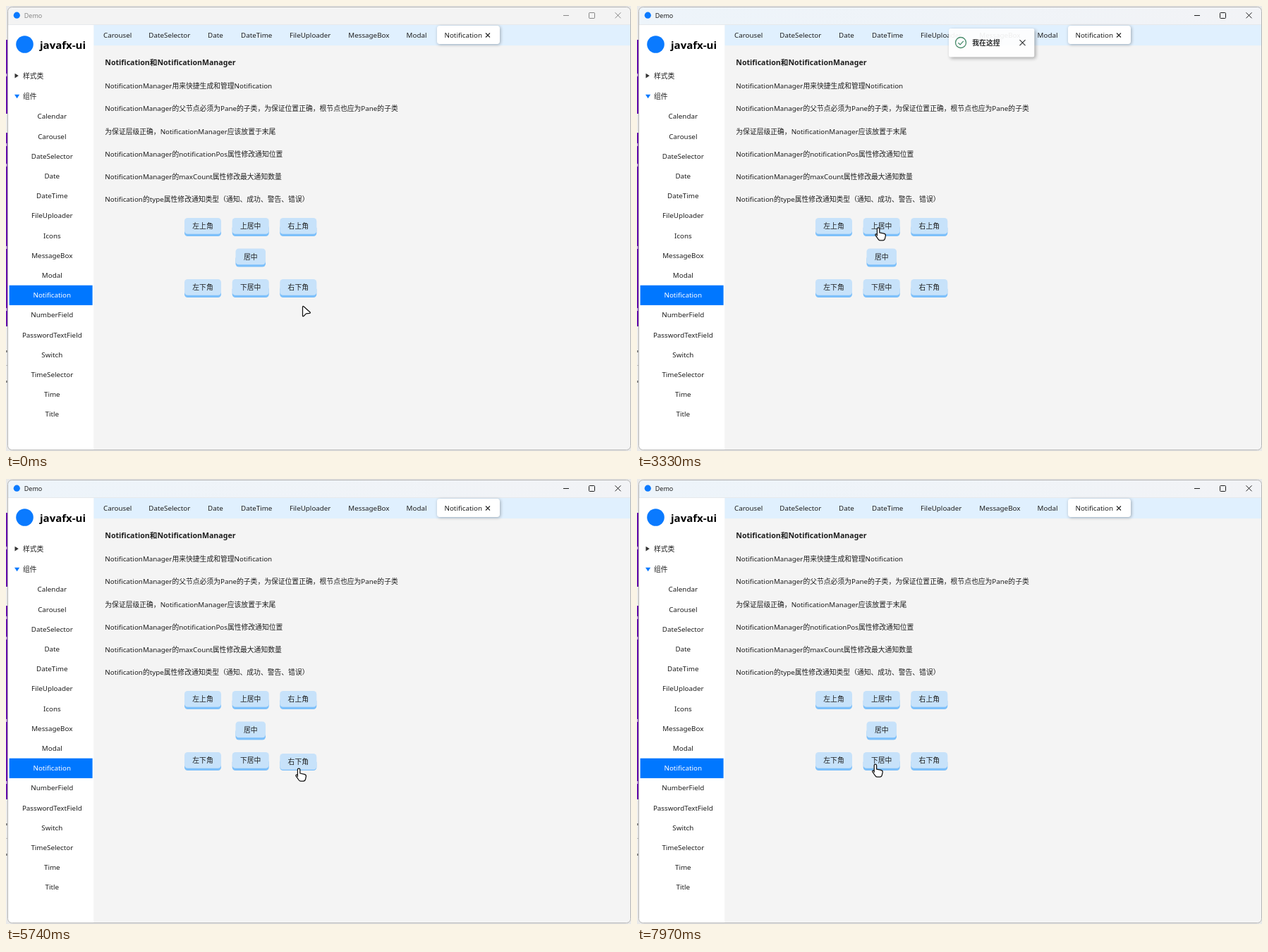
Recreate the animation shown at these times as an HTML page. Size 886 by 632 pixels, loop 8 s.

```html
<!DOCTYPE html>
<html lang="zh-CN">
<head>
<meta charset="utf-8">
<title>Demo</title>
<style>
html, body { margin: 0; width: 100%; height: 100%; overflow: hidden; background: #e9e9e9; }
svg { display: block; width: 886px; height: 632px; font: 9.8px "Noto Sans", "Noto Sans CJK SC", "Noto Sans CJK", sans-serif; fill: #1e1e1e; }
.mid { text-anchor: middle; }
.b { font-weight: 700; }
.shadow { filter: drop-shadow(1px 1px 2px rgba(0,0,0,.3)); }
.toast { filter: drop-shadow(2px 2px 2.5px rgba(0,0,0,.34)); }
</style>
</head>
<body>
<svg id="stage" viewBox="0 0 886 632" xmlns="http://www.w3.org/2000/svg">
  <defs>
    <linearGradient id="mica"><stop stop-color="#edf4fa"/><stop offset="1" stop-color="#f2f3f6"/></linearGradient>
    <clipPath id="win"><rect x="2.5" y="1.5" width="883" height="629" rx="6"/></clipPath>
  </defs>
  <g id="strip"></g>
  <g clip-path="url(#win)">
    <rect width="886" height="632" fill="#f3f3f3"/>
    <rect id="glow" width="886" height="27" fill="url(#mica)"/>
    <rect y="26" width="886" height="1" fill="#e6e9ec"/>
    <rect y="27" width="124.5" height="605" fill="#fff"/>
    <rect x="124.5" y="27" width="762" height="29.3" fill="#e0f0fe"/>
    <rect x="124.5" y="56.3" width="762" height="576" fill="#f4f4f4"/>
  </g>
  <rect x="2.5" y="1.5" width="883" height="629" rx="6" fill="none" stroke="#b4b4b4"/>
  <circle cx="15.3" cy="13.2" r="4.6" fill="#0a7aff"/>
  <g id="caption">
    <text x="25.8" y="16.8" font-size="9">Demo</text>
    <path d="M790 13.5h8M826.5 10.5q0-1 1-1h6q1 0 1 1v6q0 1-1 1h-6q-1 0-1-1zM863.5 9.3l8 8m0-8l-8 8" fill="none" stroke="#111" stroke-width=".95"/>
  </g>
  <circle cx="26.5" cy="54.5" r="12.3" fill="#0a7aff"/>
  <text class="b" x="48" y="61" font-size="15" fill="#000">javafx-ui</text>
  <path d="M12.5 95.7l5.3 3.4-5.3 3.4z" fill="#333"/>
  <path d="M12 125.8h7.2l-3.6 5.4z" fill="#0a7aff"/>
  <text x="24" y="103">样式类</text>
  <text x="24" y="132">组件</text>
  <rect x="4.6" y="396.7" width="118" height="28.2" fill="#0077ff"/>
  <g id="menu"></g>
  <rect class="shadow" x="611" y="28" width="89" height="26" rx="4" fill="#fff"/>
  <g id="tabs"></g>
  <path d="M680 38.5l6 6m0-6l-6 6" stroke="#222" stroke-width="1.1"/>
  <text class="b" x="140.3" y="83.8" font-size="10.6">Notification和NotificationManager</text>
  <g id="lines"></g>
  <g id="buttons"></g>
  <g id="toasts"></g>
  <g id="cursor" fill="#fff" stroke="#111" stroke-width="1.25" stroke-linejoin="round">
    <path id="arrow" d="M.5 1.5V13.8q.2 1.5 1.4.7l3.6-3.6 5-.6q1.5-.4.4-1.5L2 .7Q.6 0 .5 1.5z"/>
    <path id="hand" d="M-1.6 11.2V1.6a1.7 1.7 0 0 1 3.4 0V6.8l6.2 1.3q2.6.7 2.4 3l-.9 4.2q-.7 2.6-3 2.6h-3.6q-1.7 0-2.8-1.6l-4-5.6q-.6-1.6.8-1.9.9-.1 1.5.8z"/>
  </g>
</svg>
<script>
const LOOP = 8000;
const $ = id => document.getElementById(id);
const clamp = v => Math.max(0, Math.min(1, v));
const ramp = (t, a, b) => clamp((t - a) / (b - a));
const ease = p => p * p * (3 - 2 * p);
const rect = (x, y, w, h, fill, rx = 0) =>
  `<rect x="${x}" y="${y}" width="${w}" height="${h}" rx="${rx}" fill="${fill}"/>`;
const text = (x, y, s, extra = '') => `<text x="${x}" y="${y}" ${extra}>${s}</text>`;

// sliver of the window behind
$('strip').innerHTML = rect(0, 48, 3, 105, '#6508ad') + rect(0, 180, 3, 275, '#6508ad') +
  [98, 197, 226, 343, 431].map(y => rect(0, y - 2, 1.3, 4, '#d9c8ea')).join('') +
  [490, 533].map(y => rect(0, y - 1, 1.6, 3, '#777')).join('') + rect(0, 510, 2, 1, '#bbb');

$('menu').innerHTML = ['Calendar', 'Carousel', 'DateSelector', 'Date', 'DateTime', 'FileUploader',
  'Icons', 'MessageBox', 'Modal', 'Notification', 'NumberField', 'PasswordTextField', 'Switch',
  'TimeSelector', 'Time', 'Title']
  .map((s, i) => text(65.3, 160.4 + 28.2 * i, s, 'class="mid"' + (i === 9 ? ' fill="#fff"' : ''))).join('');

$('tabs').innerHTML = [['Carousel', 138], ['DateSelector', 202.3], ['Date', 286], ['DateTime', 333],
  ['FileUploader', 402], ['MessageBox', 485.3], ['Modal', 567.6], ['Notification', 621.5]]
  .map(([s, x]) => text(x, 45.2, s)).join('');

$('lines').innerHTML = ['NotificationManager用来快捷生成和管理Notification',
  'NotificationManager的父节点必须为Pane的子类，为保证位置正确，根节点也应为Pane的子类',
  '为保证层级正确，NotificationManager应该放置于末尾',
  'NotificationManager的notificationPos属性修改通知位置',
  'NotificationManager的maxCount属性修改最大通知数量',
  'Notification的type属性修改通知类型（通知、成功、警告、错误）']
  .map((s, i) => text(140.3, 117.1 + 32.2 * i, s)).join('');

const buttons = [['左上角', 253, 301], ['上居中', 320.7, 301], ['右上角', 388.3, 301], ['居中', 325.5, 344.5],
  ['左下角', 253, 388], ['下居中', 320.7, 388], ['右下角', 388.3, 388]]
  .map(([label, x, y]) => ({ label, x, y, w: label.length > 2 ? 52 : 42.5 }));

$('buttons').innerHTML = buttons.map(b => rect(b.x, b.y + 10, b.w, 16, '#7dc0fa', 4.5) +
  `<g class="face">${rect(b.x, b.y, b.w, 22.7, '#c7e2fa', 4.5)}` +
  text(b.x + b.w / 2, b.y + 15.4, b.label, 'class="mid"') + '</g>').join('');
const faces = document.querySelectorAll('.face');

// press time, release time, pressed button, toast corner, success style
const clicks = [
  { down: 370, up: 420, btn: 0, x: 130, y: 32 },
  { down: 2220, up: 2270, btn: 1, x: 442, y: 32, ok: true },
  { down: 3870, up: 3920, btn: 3, x: 441.5, y: 305.3 },
  { down: 5740, up: 5890, btn: 6, x: 752, y: 578.8 }
];
const info = '<circle cx="17" cy="19.8" r="8.4" fill="#2080f0"/><circle cx="17" cy="15.7" r="1.2" fill="#fff"/>' +
  '<rect x="16.1" y="18" width="1.8" height="6.6" rx=".8" fill="#fff"/>';
const done = '<g fill="none" stroke="#3d8560" stroke-width="1.3"><circle cx="17" cy="20" r="7.5"/>' +
  '<path d="M13.4 20.2l2.7 2.7 4.7-5"/></g>';

$('toasts').innerHTML = clicks.map(({ x, y, ok }) => {
  const w = ok ? 121.3 : 123, c = w - 16.8;
  return `<g class="toast" transform="translate(${x} ${y})">${rect(0, 0, w, 40.5, '#fff', 2.5)}${ok ? done : info}` +
    text(ok ? 33.3 : 35, 24.1, '我在这捏', 'class="b"') +
    `<path d="M${c - 4} 16.2l8 8m0-8l-8 8" stroke="#222" stroke-width="1.1"/></g>`;
}).join('');
const toasts = document.querySelectorAll('.toast');

// start, end, destination of the pointer
const moves = [[50, 360, 266, 309], [1480, 1840, 342, 315], [3480, 3750, 342.3, 356],
  [5200, 5640, 415, 411.2], [7520, 7960, 337.8, 405.3]];

function pointer(t) {
  let x = 420, y = 426;
  for (const [a, b, tx, ty] of moves) {
    const p = ease(ramp(t, a, b));
    x += (tx - x) * p;
    y += (ty - y) * p;
  }
  return [x, y];
}

function draw(t) {
  const active = ramp(t, 350, 860);
  $('glow').setAttribute('opacity', active);
  $('caption').setAttribute('opacity', .5 + .5 * active);

  faces.forEach((f, i) => {
    const held = clicks.some(c => c.btn === i && t >= c.down && t < c.up);
    f.setAttribute('transform', `translate(0 ${held ? 2 : 0})`);
  });
  clicks.forEach((c, i) => {
    const a = ramp(t, c.up, c.up + 150) - ramp(t, c.up + 1050, c.up + 1200);
    toasts[i].style.opacity = a;
    toasts[i].style.display = a > 0 ? '' : 'none';
  });

  const [x, y] = pointer(t);
  const over = buttons.some(b => x > b.x && x < b.x + b.w && y > b.y && y < b.y + 26);
  $('cursor').setAttribute('transform', `translate(${x.toFixed(2)} ${y.toFixed(2)})`);
  $('hand').style.display = over ? '' : 'none';
  $('arrow').style.display = over ? 'none' : '';
}

const start = performance.now();
function tick() {
  draw((performance.now() - start) % LOOP);
  requestAnimationFrame(tick);
}
tick();
</script>
</body>
</html>
```
